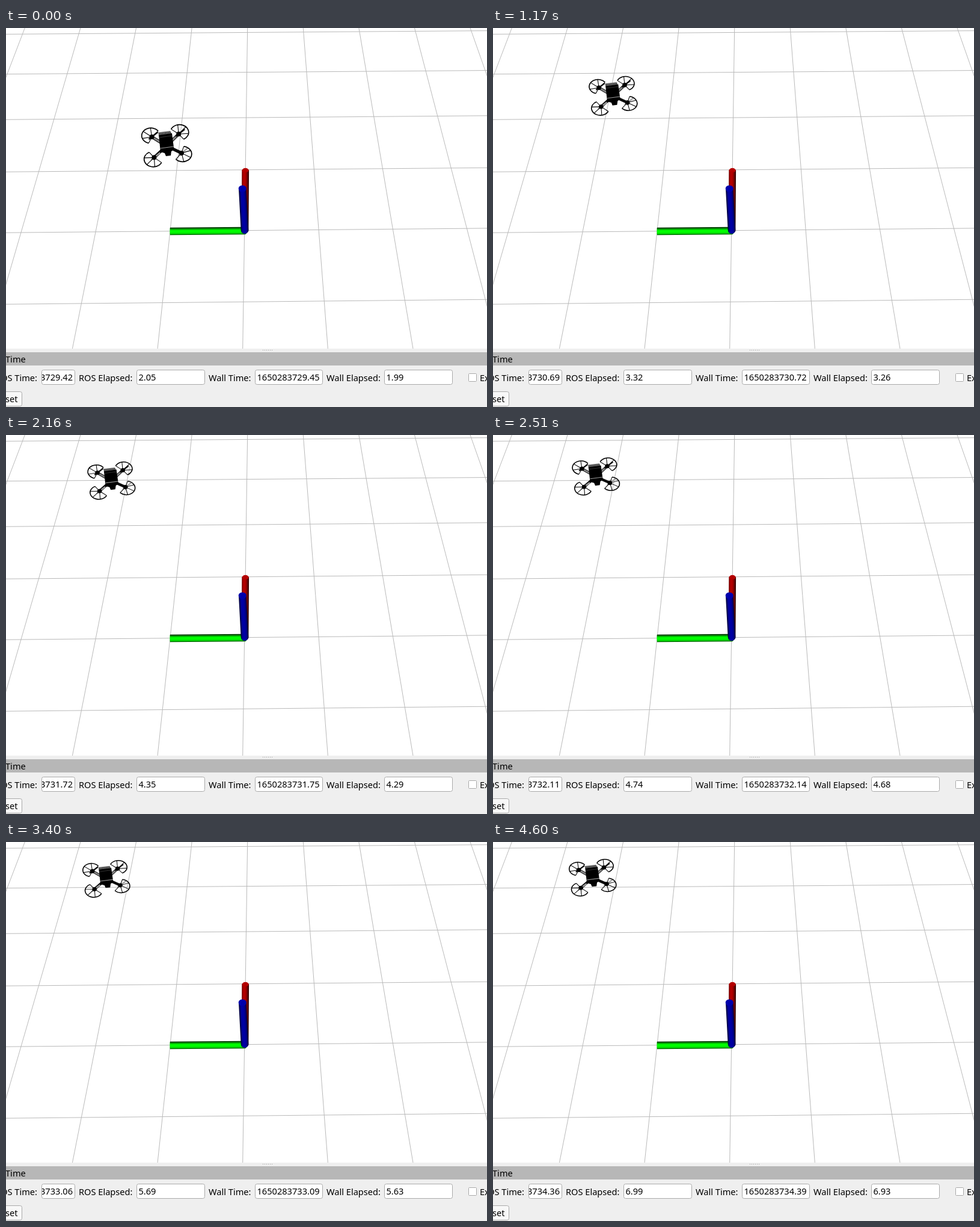
An HTML page with a canvas that plays this animation: 800x630 px, repeating every 4640 ms.

```html
<!DOCTYPE html>
<html lang="en">
<head>
<meta charset="utf-8">
<title>Drone flight</title>
<style>
  html, body { margin: 0; width: 800px; height: 630px; overflow: hidden; background: #fff; }
  canvas { display: block; }
</style>
</head>
<body>
<canvas id="stage" width="800" height="630"></canvas>
<script>
const ctx = document.getElementById('stage').getContext('2d');
const LOOP = 4640, STEP = 40, PHASE = 10;

// Approach to the goal: 1 at the start, settling to 0 (t in seconds).
const remaining = (t, rate, gain) => Math.exp(-t * (rate + gain * t));

function line(x0, y0, x1, y1) {
  ctx.beginPath();
  ctx.moveTo(x0, y0);
  ctx.lineTo(x1, y1);
  ctx.stroke();
}

function stroke(colour, width, ...ends) {
  ctx.strokeStyle = colour;
  ctx.lineWidth = width;
  line(...ends);
}

function rect(x, y, w, h, fill) {
  ctx.fillStyle = fill;
  ctx.fillRect(x, y, w, h);
}

function disc(x, y, rx, ry, fill) {
  ctx.fillStyle = fill;
  ctx.beginPath();
  ctx.ellipse(x, y, rx, ry, 0, 0, Math.PI * 2);
  ctx.fill();
}

function text(s, x, y, align = 'left') {
  ctx.fillStyle = '#000';
  ctx.textAlign = align;
  ctx.fillText(s, x, y);
}

// Ground plane in perspective, horizon far above the stage.
function grid() {
  for (let k = -1; k <= 4; k++) {
    const y = 1342.5 / (1 + 0.0812 * k) - 1005.9;
    const slope = 0.0072 + y * 6e-6;
    stroke('#bababa', 1, 0, y + 397 * slope, 800, y - 403 * slope);
  }
  for (let k = -4; k <= 4; k++) {
    const x = 401.7 + 92.6 * k;
    stroke('#bababa', 1, x, 0, x + 533 * (0.092 * k - 0.015), 533);
  }
}

// Shaded cylinder; colours run across its width.
function rod(x0, y0, x1, y1, r, colours, startCap, endCap) {
  const length = Math.hypot(x1 - x0, y1 - y0);
  const shade = ctx.createLinearGradient(0, -r, 0, r);
  colours.forEach((c, i) => shade.addColorStop(i / (colours.length - 1), c));
  ctx.save();
  ctx.translate(x0, y0);
  ctx.rotate(Math.atan2(y1 - y0, x1 - x0));
  ctx.fillStyle = shade;
  ctx.beginPath();
  ctx.ellipse(0, 0, startCap, r, 0, Math.PI / 2, Math.PI * 1.5);
  ctx.ellipse(length, 0, endCap, r, 0, -Math.PI / 2, Math.PI / 2);
  ctx.fill();
  ctx.restore();
}

function axes() {
  rod(398.2, 237, 397.5, 337, 5.9, ['#200000', '#780000', '#b00000', '#b40000', '#700000'], 3, 3);
  disc(398.2, 236.5, 5.5, 3.7, '#b40000');
  rod(273, 338, 397, 337, 6.3, ['#001800', '#009000', '#0f0', '#0f0', '#00e000', '#005000'], 0.5, 4);
  rod(393.3, 267, 397, 336, 6.3, ['#000038', '#000090', '#0000a8', '#000098', '#000030'], 5, 6);
  disc(393.2, 267, 6.5, 5.6, '#0000ac');
}

// Drone in an 84 x 71 box around its centre.
const centre = [42, 36];
const rotors = [[16, 19], [63.5, 13.5], [20, 58], [68.5, 49.5]];
const chassis = new Path2D('M29 18L51 15L54.5 42L50 45L49 52L41 53L39 48L32 46Z');
const deck = new Path2D('M28 13.5L48 11L51 16L29 19Z');
const SWEEP = 1.9, SPOKES = 5;

function rotor(x, y) {
  const front = y > centre[1];
  const facing = Math.atan2(y - centre[1], x - centre[0]);
  const hub = [x + (centre[0] - x) * 0.06, y + (centre[1] - y) * 0.12];
  stroke('#0a0a0a', 5, ...hub, ...centre);
  if (!front) stroke('#8a8a8a', 3, ...hub, ...centre);
  stroke(front ? '#a0a0a0' : '#111', 2.5, hub[0] - 5, hub[1] + 4, hub[0] + 10, hub[1] - 8);
  ctx.strokeStyle = '#000';
  ctx.lineWidth = 1.7;
  ctx.beginPath();
  ctx.ellipse(x, y, 15.3, 12.8, 0, facing - SWEEP, facing + SWEEP);
  ctx.stroke();
  for (let i = 0; i < SPOKES; i++) {
    const a = facing + SWEEP * (2 * i / (SPOKES - 1) - 1);
    stroke('#000', 1.1, ...hub, x + 15.3 * Math.cos(a), y + 12.8 * Math.sin(a));
  }
  disc(...hub, 4, 4, '#000');
}

function drone(t) {
  const dx = remaining(t, 0.72, 0.18), dy = remaining(t, 0.57, 0.195);
  ctx.save();
  ctx.translate(126 + 99 * dx, 28 + 132 * dy);
  ctx.scale(0.94 + 0.06 * dx, 0.87 + 0.13 * dy);
  for (const [x, y] of rotors) rotor(x, y);
  ctx.fillStyle = '#777';
  ctx.fill(deck);
  ctx.setLineDash([1, 1.5]);
  stroke('#222', 3, 30, 16, 49, 13.5);
  ctx.setLineDash([]);
  ctx.fillStyle = '#000';
  ctx.fill(chassis);
  stroke('#999', 1.2, 32, 40, 54, 37);
  stroke('#444', 0.8, 30, 22, 51, 19);
  ctx.restore();
}

function box(x, y, w, h, radius, fill = '#fff') {
  ctx.beginPath();
  ctx.roundRect(x + 0.5, y + 0.5, w - 1, h - 1, radius);
  ctx.fillStyle = fill;
  ctx.fill();
  ctx.strokeStyle = '#aaa';
  ctx.lineWidth = 1;
  ctx.stroke();
}

function field(label, x, value, boxX, boxW) {
  text(label, x, 586.5);
  box(boxX, 568, boxW, 25, 3);
  text(value, boxX + 3.5, 586);
}

function panel(t) {
  const clock = Math.floor(42.95 + 108 * t);
  const seconds = hundredths => (hundredths / 100).toFixed(2);
  const stamp = hundredths => seconds(165028372900 + hundredths);

  rect(0, 533, 800, 97, '#efefef');
  for (let x = 427; x < 444; x += 3) rect(x, 535, 1, 1, '#999');
  rect(0, 539, 800, 22, '#b7b7b7');
  ctx.font = '14.6px "Noto Sans", "Open Sans", sans-serif';
  text('Time', -1, 556);

  text('ROS Time:', 52, 586.5, 'right');
  box(59, 568, 56, 25, 3);
  ctx.save();
  ctx.beginPath();
  ctx.rect(60, 569, 54, 23);
  ctx.clip();
  text(stamp(clock), 111, 586, 'right');
  ctx.restore();

  field('ROS Elapsed:', 121, seconds(clock + 163), 217, 114);
  field('Wall Time:', 337, stamp(clock + 3), 414, 113);
  field('Wall Elapsed:', 533, seconds(clock + 157), 629, 114);

  box(769, 574, 14, 14, 1);
  text('Experimental', 788, 586.5);
  box(-20, 604, 47, 25, 3, '#f8f8f8');
  text('Reset', 19.5, 621.5, 'right');
}

function draw(now) {
  const held = Math.floor((now % LOOP - PHASE) / STEP) * STEP + PHASE;
  const t = Math.max(0, held) / 1000;
  rect(0, 0, 800, 630, '#fff');
  grid();
  axes();
  drone(t);
  panel(t);
}

const start = performance.now();
function loop() {
  draw(performance.now() - start);
  requestAnimationFrame(loop);
}
loop();
</script>
</body>
</html>
```
